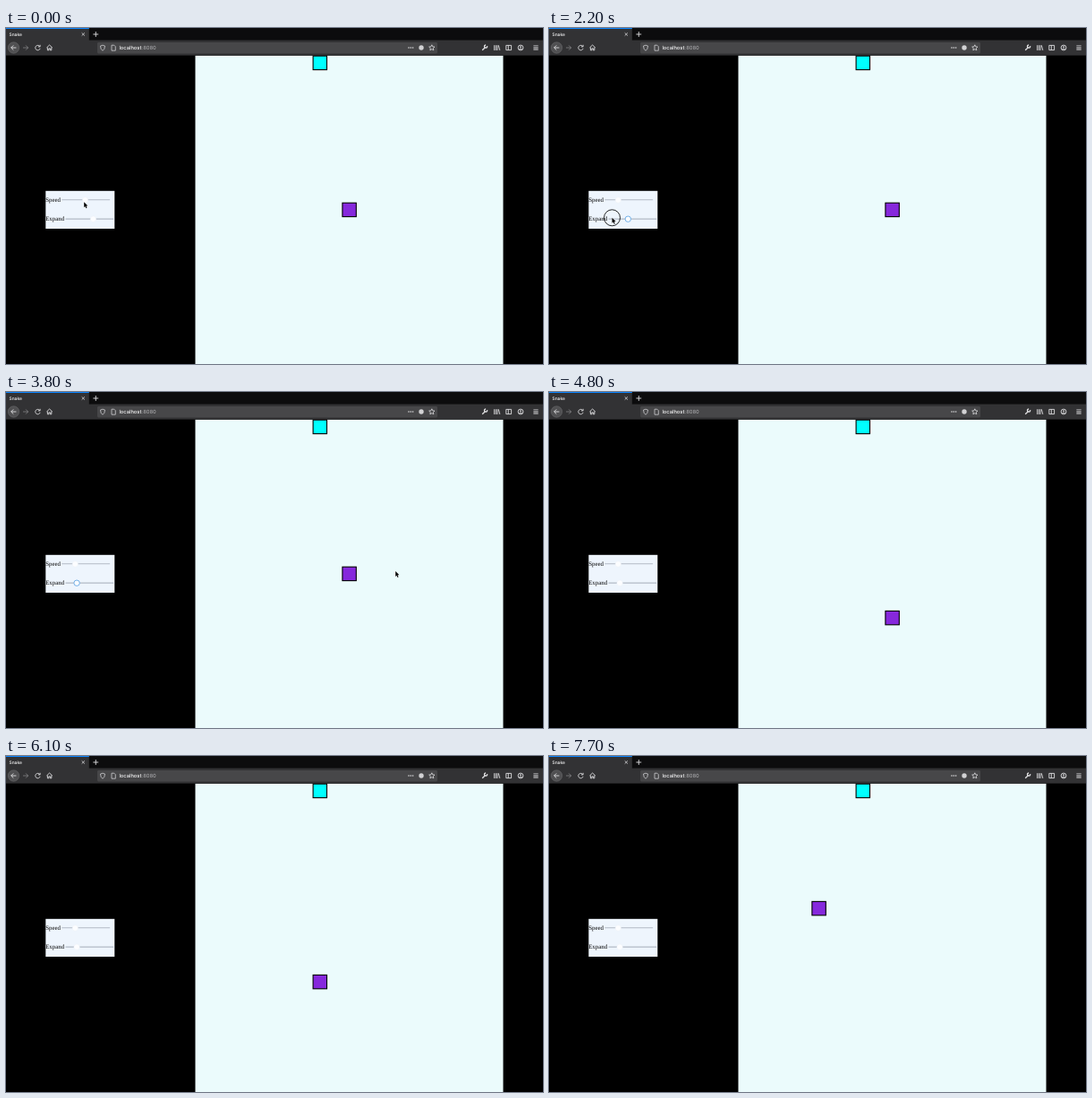
An HTML page for the animation above (8 s loop, 600 by 375 pixels).

```html
<!DOCTYPE html>
<html lang="en">
<head>
<meta charset="utf-8">
<title>Snake</title>
<style>
  html, body { margin: 0; width: 100%; height: 100%; overflow: hidden; background: #000; }
  svg { display: block; width: 100vw; height: 100vh; text-rendering: geometricPrecision; }
  .ui { font-family: Inter, Roboto, sans-serif; font-weight: 500; fill: #f9f9fa; }
  .label { font: 6.83px "Liberation Serif", serif; }
  .icon { fill: none; stroke: #e0e0e2; stroke-width: .9; stroke-linejoin: round; }
  .cell { stroke: #000; stroke-width: 1.1; }
  .track { stroke: #b3bbc6; stroke-width: 1.1; stroke-linecap: round; }
  .thumb { fill: #fcfdff; stroke: #e9eef5; stroke-width: .4; }
  .thumb.focus { stroke: #65a9e6; stroke-width: .9; }
</style>
</head>
<body>
<svg viewBox="0 0 600 375">
  <!-- browser window -->
  <rect width="600" height="14" fill="#0c0c0d"/>
  <rect y="13.6" width="600" height="17" fill="#323234"/>
  <rect width="92.8" height="14" fill="#323234"/>
  <rect width="92.8" height="1" fill="#0a84ff"/>
  <text class="ui" x="3.5" y="8.9" font-size="4.9">Snake</text>
  <rect x="102" y="16" width="380" height="12.4" rx="1.4" fill="#474749"/>
  <text class="ui" x="126.4" y="24.2" font-size="5.75">localhost<tspan fill="#a5a5a8">:8080</tspan></text>
  <circle cx="8.5" cy="22" r="6.2" fill="#505052" stroke="#69696b" stroke-width=".6"/>
  <g class="icon">
    <path id="plus" d="M97.4 7h5.8m-2.9-2.9v5.8"/>
    <use href="#plus" transform="translate(86.3 7) rotate(45) scale(.8) translate(-100.3 -7)"/>
    <path id="arrow" d="M11.4 22H5.8m2.5-2.6L5.7 22l2.6 2.6"/>
    <use href="#arrow" transform="matrix(-1 0 0 1 30.4 0)" opacity=".4"/>
    <path d="M37.7 20.5a2.7 2.7 0 1 0 .4 2.3M38.1 18.8v2.1h-2.2"/>
    <path d="M45.4 22l3.2-3 3.2 3M46.4 21.6v3.2h1.5v-2h1.4v2h1.5v-3.2"/>
    <path d="M108 19.2l2.5.8q0 4-2.5 5.3-2.5-1.3-2.5-5.3z" stroke-width=".7"/>
    <path d="M118 19.2h2.8l1.5 1.5v4.5H118z" stroke-width=".7"/>
    <path d="M450 22h5" stroke-width="1.6" stroke-linecap="round" stroke-dasharray="0 2.3"/>
    <polygon id="star" stroke-width=".8"/>
    <path d="M532.2 24.8l3.6-3.6m1.8-1.1a1.6 1.6 0 1 1-1.5-1.1" stroke-width="1.3"/>
    <path d="M545.6 19.2v5.8m1.8-5.8v5.8m1.7-5.8v5.8m1.2-5.7l1.5 5.6"/>
    <path d="M558.8 19.4h5.8v5.2h-5.8zm2.5 0v5.2"/>
    <path d="M573.3 23.8q1.7-1.5 3.4 0"/>
    <circle cx="575" cy="22" r="2.9"/>
    <circle cx="575" cy="21.2" r=".6"/>
    <path d="M592 19.4v5.2" stroke-width="5.3" stroke-dasharray=".9 1.2"/>
  </g>
  <circle cx="464" cy="22" r="2.7" fill="#d2d2d4"/>

  <!-- board -->
  <rect x="211.5" y="30.9" width="344" height="345" fill="#ebfbfc"/>
  <rect class="cell" id="food" width="15.4" height="15.4" fill="#0ff"/>
  <rect class="cell" id="snake" width="15.4" height="15.4" fill="#8628dc"/>

  <!-- controls -->
  <rect x="44.3" y="181.8" width="77" height="42.2" fill="#eef5fd"/>
  <text class="label" x="44.2" y="194">Speed</text>
  <text class="label" x="44.2" y="215.3">Expand</text>
  <path class="track" d="M62.7 191.8h53M66.8 213.1h53"/>
  <circle class="thumb" id="speed" cy="192" r="3.2"/>
  <circle class="thumb" id="expand" cy="213.2" r="3.2"/>

  <g id="cursor">
    <circle id="press" r="9" fill="none" stroke="#111" stroke-width=".9"/>
    <path d="M0 0v5.9l1.3-1.2 1 2.2 1-.4-1-2.2h1.9z" stroke="#fff" stroke-width=".6" paint-order="stroke"/>
  </g>
</svg>
<script>
const LOOP = 8000, TICK = 100, CELL = 16.4;
const ROUTE = "DDDDDLLUUULLLUUUU";
const $ = id => document.getElementById(id);

const within = (t, from, to) => t >= from && t < to;
const ramp = (t, from, to) => Math.min(1, Math.max(0, (t - from) / (to - from)));
const overshoot = p => 1 + 2.3 * (p - 1) ** 3 + 1.3 * (p - 1) ** 2;

function pointer(t) {
  const hover = ramp(t, 100, 300), dragSpeed = ramp(t, 300, 700), descend = ramp(t, 1000, 1200);
  const dragExpand = ramp(t, 1600, 2300), back = ramp(t, 2300, 3200), leave = ramp(t, 3300, 3800);
  return [
    87.2 + 5 * hover - 15 * dragSpeed + 19 * descend - 35 * dragExpand ** 2 + 14 * back + 360 * overshoot(leave),
    194.3 - 2.5 * hover + 21.7 * descend - 2 * dragExpand + 3.5 * back - 15 * leave + 14 * Math.sin(Math.PI * leave)
  ];
}

// The first three moves come before a short pause.
function snakeCell(t) {
  const moves = ROUTE.slice(0, Math.floor(Math.max(0,
    t < 5000 ? (t - 4200) / 200 : (t - 4300) / 200)));
  const count = dir => moves.split(dir).length - 1;
  return [10 - count("L"), 10 + count("D") - count("U")];
}

function place(id, [col, row]) {
  $(id).setAttribute("x", 211.9 + col * CELL);
  $(id).setAttribute("y", 31.2 + row * CELL);
}

function draw(t) {
  place("snake", snakeCell(t));
  $("speed").setAttribute("cx", 88.5 - 11.2 * ramp(t, 300, 700));
  $("expand").setAttribute("cx", 97.5 - 9.2 * ((t >= 2000) + (t >= 2300)));
  $("speed").classList.toggle("focus", within(t, 300, 1600));
  $("expand").classList.toggle("focus", within(t, 1600, 3900));

  const pressed = within(t, 300, 1000) || within(t, 1600, 3200) || within(t, 3900, 4000);
  $("press").style.display = pressed ? "" : "none";
  $("cursor").style.display = t < 4400 ? "" : "none";
  $("cursor").setAttribute("transform", `translate(${pointer(t)})`);
}

place("food", [8, 0]);
$("star").setAttribute("points", Array.from({ length: 10 }, (_, i) => {
  const angle = i * Math.PI / 5, radius = i % 2 ? 1.6 : 3.3;
  return [475.8 + radius * Math.sin(angle), 22.1 - radius * Math.cos(angle)];
}).join(" "));

const start = performance.now();
function frame() {
  const t = (performance.now() - start) % LOOP;
  draw(Math.floor(t / TICK) * TICK);
  requestAnimationFrame(frame);
}
frame();
</script>
</body>
</html>
```
